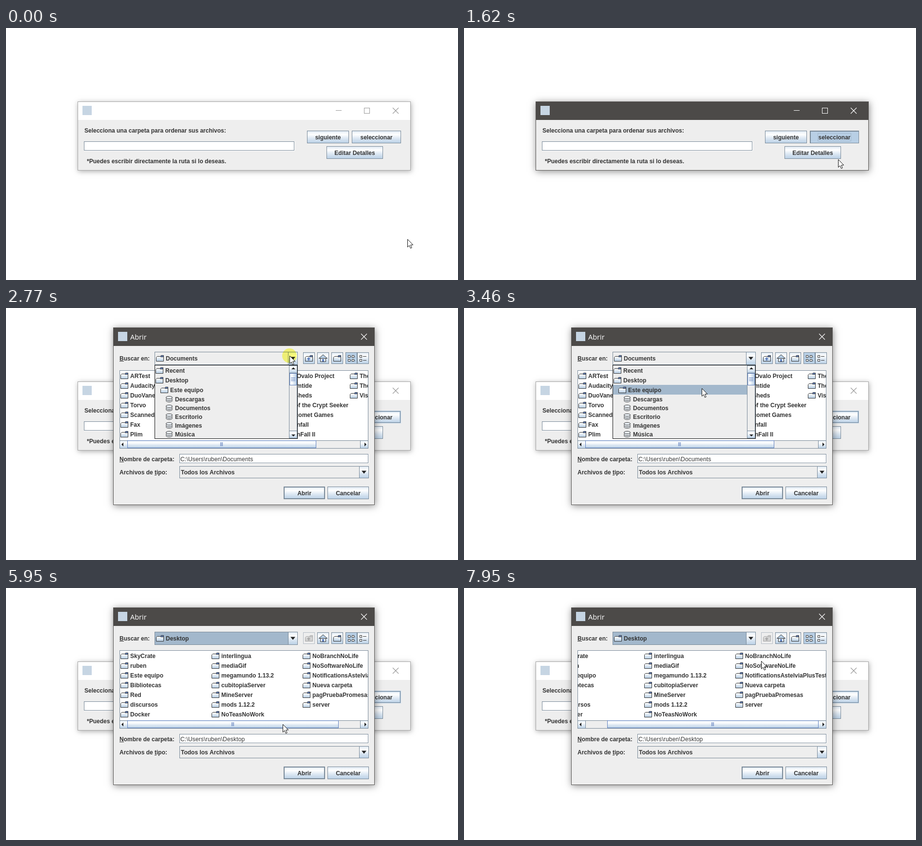
Write an HTML page with a canvas that moves like this. It is 928x518 px and loops after 8 s.

```html
<!DOCTYPE html>
<html lang="es">
<head>
<meta charset="utf-8">
<style>
html, body { margin: 0; width: 100%; height: 100%; overflow: hidden; background: #fff; }
canvas { display: block; width: 928px; height: 518px; }
</style>
</head>
<body>
<canvas id="stage" width="928" height="518"></canvas>
<script>
const g = document.getElementById('stage').getContext('2d');
const LOOP = 8000;
const INK = '#333', EDGE = '#7a8a99', PALE = '#b8cfe5', FOCUS = '#a3b8cc', BLUE = '#6382bf', PANEL = '#eee', DARK = '#4c4a48';
const BOLD = 'bold 12px "Liberation Sans", Arial, sans-serif';
const PLAIN = '12px "Liberation Sans", Arial, sans-serif';
const TITLE = '14.5px "Open Sans", "Noto Sans", sans-serif';

const PRESS = 1380, OPEN = 1846, POPUP = 2620, CHOOSE = 4630;
const CLICKS = [[PRESS, 1535], [POPUP, 2915], [4560, CHOOSE], [6105, 7095]];

// Pointer bursts: start, end, steps, then waypoints [step, x, y]
const MOVES = [
  [70, 370, 5, [1, 752, 300], [4, 690, 196]],
  [620, 690, 2, [1, 689, 210]],
  [840, 920, 2, [1, 699, 218]],
  [1230, 2000, 11, [2, 742, 224], [3, 743, 225], [5, 768, 270], [7, 738, 262], [9, 625, 229], [10, 586, 186]],
  [2070, 2770, 10, [6, 582, 98], [9, 582, 98]],
  [2920, 3310, 6, [0, 580, 106], [5, 520, 250]],
  [3460, 3840, 6, [0, 488, 165], [5, 480, 153]],
  [4160, 4160, 1, [0, 478, 157]],
  [4950, 5640, 10, [9, 547, 287]],
  [5870, 6260, 6, [1, 568, 280], [3, 568, 280], [5, 588, 277]],
  [6490, 6870, 6, [0, 600, 275], [2, 625, 270], [5, 643, 269]],
  [7100, 7870, 11, [0, 634, 266], [5, 480, 215], [10, 610, 157]],
  [7950, 7950, 1, [0, 610, 150]]
];

const DOCS = [
  ['ARTest', 'Audacity', 'DuoVane', 'Torvo', 'Scanned Documents', 'Fax', 'Plim'],
  ['Fables of Varnoth', 'DUNAcopy Downloads', 'Gnomic Wardens', 'My Drawings', 'My Games', 'nani', 'KTVO'],
  ['New Ovalo Project', 'Gloomtide', 'Mix Sheds', 'Fall of the Crypt Seeker', 'Mudcomet Games', 'Orbenfall', 'OrbenFall II'],
  ['The', 'The', 'Vis']
];
const DESK = [
  ['SkyCrate', 'ruben', 'Este equipo', 'Bibliotecas', 'Red', 'discursos', 'Docker'],
  ['interlingua', 'mediaGif', 'megamundo 1.13.2', 'cubitopiaServer', 'MineServer', 'mods 1.12.2', 'NoTeasNoWork'],
  ['NoBranchNoLife', 'NoSoftwareNoLife', 'NotificationsAstelviaPlusTest', 'Nueva carpeta', 'pagPruebaPromesas', 'server']
];
const PLACES = ['Recent', 'Desktop', 'Este equipo', 'Descargas', 'Documentos', 'Escritorio', 'Imágenes', 'Música'];

const clamp = (v, a, b) => Math.max(a, Math.min(b, v));

function pointer(t) {
  let x = 824, y = 434;
  for (const [start, end, n, ...way] of MOVES) {
    if (t < start) break;
    const step = n < 2 ? 0 : Math.min(n - 1, Math.floor((t - start + 5) / (end - start) * (n - 1)));
    let from = -1;
    for (const [k, wx, wy] of way) {
      const f = clamp((step - from) / (k - from), 0, 1);
      x += (wx - x) * f;
      y += (wy - y) * f;
      if (step <= k) break;
      from = k;
    }
  }
  return { x: Math.round(x), y: Math.round(y) };
}

function rect(x, y, w, h, c) {
  g.fillStyle = c;
  g.fillRect(x, y, w, h);
}

function frame(x, y, w, h, c) {
  g.strokeStyle = c;
  g.lineWidth = 1;
  g.strokeRect(x + .5, y + .5, w - 1, h - 1);
}

function box(x, y, w, h, fill, edge) {
  rect(x, y, w, h, fill);
  frame(x, y, w, h, edge);
}

function poly(pts, fill, edge) {
  g.beginPath();
  pts.forEach(([x, y]) => g.lineTo(x, y));
  g.closePath();
  if (fill) { g.fillStyle = fill; g.fill(); }
  if (edge) { g.strokeStyle = edge; g.lineWidth = 1; g.stroke(); }
}

function text(s, x, y, font = BOLD, color = INK, align = 'left') {
  g.font = font;
  g.fillStyle = color;
  g.textAlign = align;
  g.letterSpacing = font === PLAIN ? '0.2px' : '0px';
  g.fillText(s, x, y);
}

// Label with one underlined mnemonic letter
function label(s, x, y, at) {
  text(s, x, y);
  rect(Math.round(x + g.measureText(s.slice(0, at)).width), y + 1, Math.round(g.measureText(s[at]).width), 1, INK);
}

function ocean(x, y, w, h, sideways) {
  const gr = sideways ? g.createLinearGradient(x, 0, x + w, 0) : g.createLinearGradient(0, y, 0, y + h);
  gr.addColorStop(0, '#dde8f3');
  gr.addColorStop(.3, '#fff');
  gr.addColorStop(.6, '#dde8f3');
  gr.addColorStop(1, PALE);
  return gr;
}

function button(s, x, y, w, state) {
  const h = 26, mid = x + w / 2;
  box(x, y, w, h, state === 'down' ? PALE : ocean(x, y, w, h), EDGE);
  if (state === 'main') frame(x + 1, y + 1, w - 2, h - 2, EDGE);
  if (state === 'hover') {
    frame(x, y, w, h, PALE);
    frame(x + 1, y + 1, w - 2, h - 2, EDGE);
    frame(x + 2, y + 2, w - 4, h - 4, PALE);
  }
  if (state === 'down') {
    rect(x, y, w, 2, EDGE);
    rect(x, y, 2, h, EDGE);
    frame(x + 16, y + 5, w - 32, 17, FOCUS);
  }
  text(s, mid, y + 18, BOLD, INK, 'center');
}

function arrow(cx, cy, dx, dy, r = 4) {
  poly([[cx + dx * r, cy + dy * r], [cx - dy * r, cy + dx * r], [cx + dy * r, cy - dx * r]], '#222');
}

function field(x, y, w, h) {
  rect(x, y, w + 1, h + 1, '#fff');
  frame(x, y, w, h, EDGE);
}

function folder(x, y, off) {
  const gr = g.createLinearGradient(0, y + 3, 0, y + 12);
  gr.addColorStop(0, off ? '#ddd' : '#fff');
  gr.addColorStop(1, off ? '#ccc' : PALE);
  const edge = off ? '#aaa' : INK;
  poly([[x + 9, y + 2.5], [x + 10.5, y + .5], [x + 15.5, y + .5], [x + 15.5, y + 4], [x + 9, y + 4]], off ? '#ccc' : BLUE, edge);
  poly([[x + .5, y + 12.5], [x + .5, y + 4.5], [x + 2.5, y + 2.5], [x + 8.5, y + 2.5], [x + 9.5, y + 3.5], [x + 15.5, y + 3.5], [x + 15.5, y + 12.5]], gr, edge);
}

function disk(x, y) {
  for (const dy of [9.5, 6.5, 3]) {
    g.beginPath();
    g.ellipse(x + 7, y + dy, 6.5, 2.7, 0, 0, 7);
    g.fillStyle = '#e8eef4';
    g.fill();
    g.strokeStyle = INK;
    g.lineWidth = 1;
    g.stroke();
  }
}

function cross(x, y, c) {
  g.strokeStyle = c;
  g.lineWidth = 1.1;
  g.beginPath();
  g.moveTo(x, y); g.lineTo(x + 12, y + 12);
  g.moveTo(x + 12, y); g.lineTo(x, y + 12);
  g.stroke();
}

function win(x, y, w, h, active) {
  g.save();
  g.shadowColor = active ? 'rgba(0,0,0,.45)' : 'rgba(0,0,0,.32)';
  g.shadowBlur = active ? 14 : 10;
  g.shadowOffsetX = 1;
  g.shadowOffsetY = 2;
  rect(x, y, w, h, PANEL);
  g.restore();
  rect(x, y, w, 38, active ? DARK : '#fff');
  frame(x, y, w, h, active ? '#5a5856' : '#a6a6a6');
  rect(x + 10, y + 9, 19, 19, '#c6d5e3');
}

function mainWindow(t, p) {
  const active = t >= PRESS && t < OPEN;
  const over = (x, y, w) => t < PRESS && p.x >= x && p.x < x + w && p.y >= y && p.y < y + 26 ? 'hover' : '';
  const c = active ? '#fff' : '#999';
  win(147, 151, 684, 142, active);
  rect(677, 169, 12, 1, c);
  frame(735, 164, 12, 12, c);
  cross(794, 164, c);
  text('Selecciona una carpeta para ordenar sus archivos:', 161, 215);
  text('*Puedes escribir directamente la ruta si lo deseas.', 166, 278);
  field(160, 233, 432, 19);
  button('siguiente', 618, 211, 86, over(618, 211, 86));
  button('seleccionar', 710, 211, 101, active ? 'down' : t >= OPEN ? 'hover' : over(710, 211, 101));
  button('Editar Detalles', 658, 243, 116, over(658, 243, 116));
}

function combo(x, y, w, h, fill) {
  box(x, y, w, h, fill, EDGE);
  box(x + w - 20, y, 20, h, ocean(x, y, 20, h), EDGE);
  poly([[x + w - 15, y + h / 2 - 3], [x + w - 5, y + h / 2 - 3], [x + w - 10, y + h / 2 + 3]], '#222');
}

function tools(desk) {
  [610, 639, 668, 697, 721].forEach((x, i) => {
    const off = i === 0 && desk;
    box(x, 91, 24, 24, i === 3 ? PALE : off ? PANEL : ocean(x, 91, 24, 24), off ? '#b4bcc4' : EDGE);
  });
  folder(614, 97, desk);
  const up = desk ? '#aaa' : BLUE;
  poly([[621.5, 101], [625.5, 105], [617.5, 105]], up);
  rect(620, 105, 3, 3, up);
  folder(672, 97);
  poly([[645.5, 103], [656.5, 103], [656.5, 110.5], [645.5, 110.5]], '#e4edf6', INK);
  poly([[642.5, 103.5], [651, 96], [659.5, 103.5]], PALE, INK);
  rect(649, 105, 4, 5, BLUE);
  for (const y of [97, 105]) {
    for (const x of [702, 710]) {
      box(x, y, 5, 5, '#fff', INK);
      rect(x + 6, y + 3, 1, 1, INK);
    }
    box(726, y, 5, 5, '#fff', INK);
    rect(733, y + 2, 7, 1, INK);
  }
}

function hbar(x, w) {
  box(233, 272, 511, 17, PANEL, EDGE);
  box(233, 272, 17, 17, ocean(233, 272, 17, 17), EDGE);
  box(727, 272, 17, 17, ocean(727, 272, 17, 17), EDGE);
  arrow(241, 280.5, -1, 0);
  arrow(736, 280.5, 1, 0);
  box(x, 272, w, 16, ocean(x, 272, w, 16), BLUE);
  const mid = Math.round(x + w / 2);
  for (const d of [-3, -1, 1]) rect(mid + d, 276, 1, 8, BLUE);
}

function files(cols, gap, scroll) {
  box(233, 128, 511, 161, '#fff', EDGE);
  g.save();
  g.beginPath();
  g.rect(234, 129, 509, 143);
  g.clip();
  cols.forEach((col, i) => col.forEach((name, j) => {
    const x = 235 + i * gap - scroll;
    folder(x, 133 + 20 * j);
    text(name, x + 20, 144 + 20 * j);
  }));
  g.restore();
}

function popup(p) {
  box(305, 117, 294, 152, PANEL, '#111');
  PLACES.forEach((name, i) => {
    const top = 118 + 20 * Math.min(i, 3) + 18 * Math.max(0, i - 3);
    const h = i < 3 ? 20 : 18;
    if (p.y >= top && p.y < top + h) rect(306, top, 276, h, FOCUS);
    const x = i < 2 ? 307 : i < 3 ? 317 : 328;
    if (i < 3) folder(x, top + 4); else disk(x, top + 3);
    text(name, x + (i < 3 ? 20 : 19), top + (i < 3 ? 15 : 14));
  });
  box(581, 118, 17, 150, PANEL, EDGE);
  box(581, 118, 17, 16, ocean(581, 118, 17, 16), EDGE);
  box(581, 252, 17, 16, ocean(581, 252, 17, 16), EDGE);
  arrow(590, 126, 0, -1);
  arrow(590, 260, 0, 1);
  box(582, 134, 15, 25, ocean(582, 134, 15, 25, true), BLUE);
  for (const y of [143, 146, 149]) rect(585, y, 9, 1, BLUE);
}

function dialog(t, p) {
  const desk = t >= CHOOSE;
  win(220, 40, 537, 365, true);
  text('Abrir', 255, 65, TITLE, '#fff');
  cross(729, 53, '#fff');
  label('Buscar en:', 233, 108, 0);
  combo(305, 90, 294, 27, PANEL);
  if (desk) rect(306, 91, 273, 25, FOCUS);
  folder(308, 97);
  text(desk ? 'Desktop' : 'Documents', 328, 108);
  tools(desk);

  const drag = desk ? clamp(pointer(Math.min(t, 7000)).x - 568, 0, 45) : 0;
  files(desk ? DESK : DOCS, desk ? 187 : 157, Math.round(drag * 52 / 45));
  hbar(249 + drag, desk ? 434 : 388);

  label('Nombre de carpeta:', 233, 315, 0);
  field(356, 300, 388, 19);
  if (t < POPUP) {
    rect(358, 302, 149, 16, PALE);
    rect(507, 302, 1, 16, INK);
  }
  text('C:\\Users\\ruben\\' + (desk ? 'Desktop' : 'Documents'), 358, 315, PLAIN);
  label('Archivos de tipo:', 233, 342, 12);
  combo(356, 325, 389, 25, PANEL);
  text('Todos los Archivos', 359, 342);
  button('Abrir', 570, 367, 85, 'main');
  button('Cancelar', 660, 367, 85);
  if (t >= POPUP && !desk) popup(p);
}

function cursor(t, { x, y }) {
  if (CLICKS.some(([a, b]) => t >= a && t < b)) {
    g.globalCompositeOperation = 'multiply';
    g.beginPath();
    g.arc(x, y, 15, 0, 7);
    g.fillStyle = '#ffff7d';
    g.fill();
    g.globalCompositeOperation = 'source-over';
  }
  const shape = [[0, 0], [0, 16], [3.5, 12.7], [6, 18.5], [8.6, 17.4], [6.2, 11.7], [11.2, 11.5]];
  poly(shape.map(([a, b]) => [x + a + .5, y + b + .3]), '#fff', '#111');
}

function draw(now) {
  const t = now % LOOP;
  const p = pointer(t);
  rect(0, 0, 928, 518, '#fff');
  mainWindow(t, p);
  if (t >= OPEN) dialog(t, p);
  cursor(t, p);
}

const t0 = performance.now();
function tick() {
  draw(performance.now() - t0);
  requestAnimationFrame(tick);
}
tick();
</script>
</body>
</html>
```
